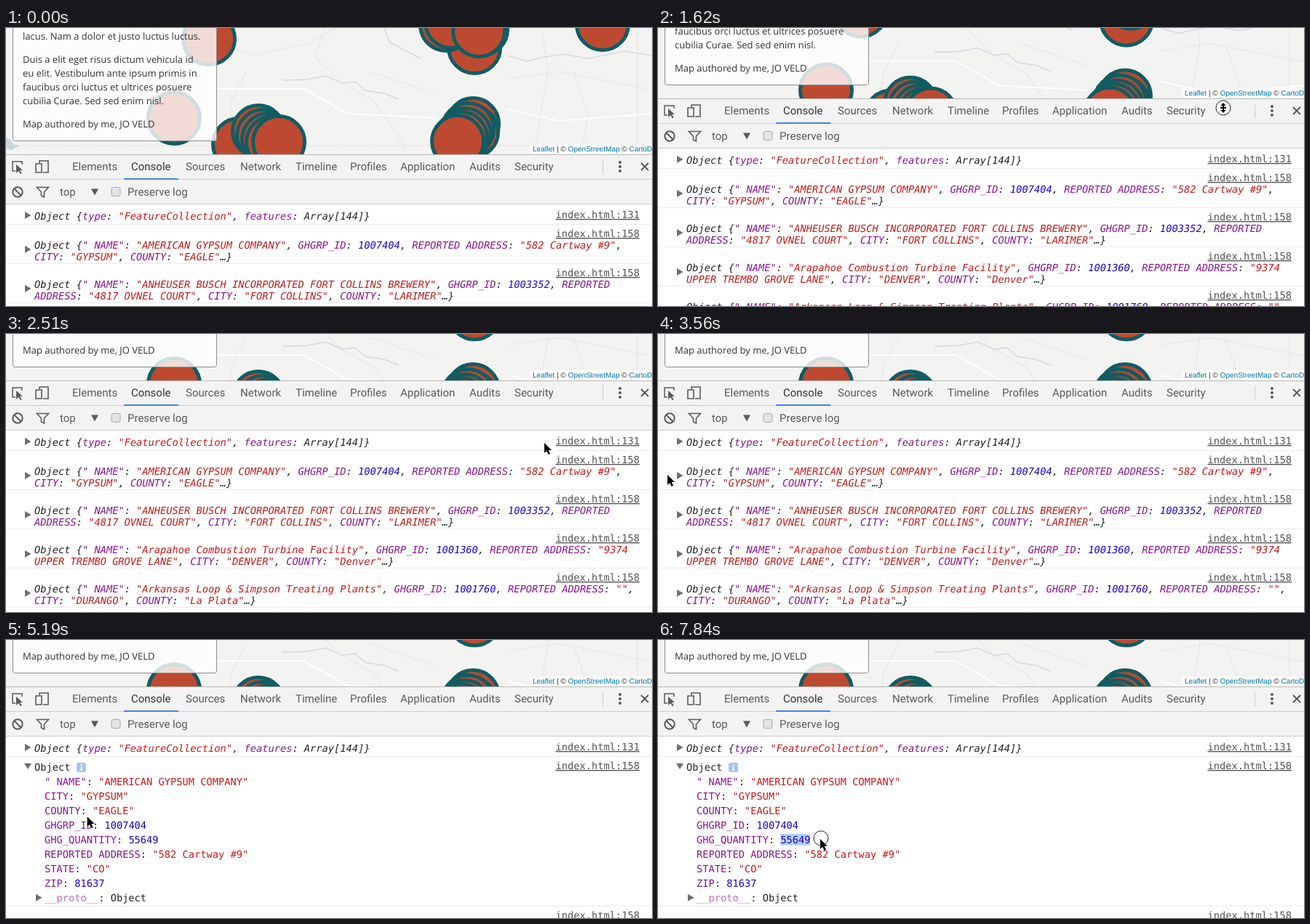
These frames come from a looping animation (888 px wide and 383 px high, 8 s). An HTML page:

```html
<!DOCTYPE html>
<html lang="en">
<head>
<meta charset="utf-8">
<title>Console walkthrough</title>
<style>
  html, body { margin: 0; width: 100%; height: 100%; overflow: hidden; background: #fff; }
  svg { display: block; text-rendering: geometricPrecision; white-space: pre; }
  .side { font: 13px "Open Sans", sans-serif; fill: #333; }
  .credit { font: 10.05px "Liberation Sans", sans-serif; fill: #333; }
  .a { fill: #0078a8; }
  .ui { font: 15px Roboto, sans-serif; fill: #5a5a5a; }
  .ui .on { fill: #333; }
  .mono { font: 13.7px "DejaVu Sans Mono", monospace; fill: #222; }
  .preview { font-style: italic; }
  .link { fill: #545454; text-decoration: underline; }
  .k { fill: #881391; }
  .s { fill: #c41a16; }
  .n { fill: #1c00cf; }
  .p { fill: #b871bd; }
  .tri { fill: #6e6e6e; }
  .rule { stroke: #ececec; }
  .icon { fill: none; stroke: #5a5a5a; stroke-width: 1.6; }
  .dots { fill: #be4931; stroke: #115c62; stroke-width: 5; }
  .road { fill: none; stroke: #e6e6ea; stroke-width: 1.2; }
  .river { fill: none; stroke: #d3dade; stroke-width: 1.5; }
</style>
</head>
<body>
<svg width="888" height="383" viewBox="0 0 888 383">
  <rect width="888" height="383" fill="#f3f3f2"/>
  <g id="map">
    <g class="road">
      <path d="M290 20L340 38 420 20 470 -10M440 -10L425 40 460 75 505 100 540 150 555 180M330 60L310 100 300 180M500 60L590 90M690 70L760 60 888 85M868 -10V180M735 -10L745 60 725 180M780 60L800 120 790 180"/>
      <path d="M290 84H410L470 118 590 124M690 112L760 128 888 118" stroke="#fff" stroke-width="2"/>
    </g>
    <path class="river" d="M380 72L412 71 440 66 462 76 480 74 494 86 520 90 540 98M690 38L716 46 740 40 766 36 800 42 850 32 890 38M520 0L528 20 570 42"/>
    <path d="M0 162H888" stroke="#ecc9cf" stroke-dasharray="2 2"/>
    <path d="M0 151L6 154 10 160 18 162 8 168 0 166Z" fill="#cbd4d8"/>
    <g id="dots" class="dots"></g>
  </g>

  <g id="page">
    <g id="side" class="side">
      <rect x="9.5" y="-260" width="280" height="305.5" rx="3" fill="#fff" fill-opacity=".8" stroke="#8c8c8c"/>
    </g>
    <rect x="720" y="50" width="168" height="14" fill="#fff" fill-opacity=".7"/>
    <text class="credit" x="724" y="60"><tspan class="a">Leaflet</tspan> | © <tspan class="a">OpenStreetMap</tspan> © <tspan class="a">CartoDB</tspan></text>

    <rect y="64" width="888" height="450" fill="#fff"/>
    <g id="body">
      <g id="first" class="mono"></g>
      <g id="rows" class="mono"></g>
      <g id="open" class="mono">
        <rect id="selection" x="168" y="267" height="16" fill="#b3d4fd"/>
        <path class="tri" d="M25 170h10l-5 8z"/>
        <rect x="97" y="169" width="13" height="13" rx="2.5" fill="#a9c5ef"/>
        <path d="M103.500 171.500v2M103.500 175v5" stroke="#fff" stroke-width="2"/>
      </g>
    </g>
    <g id="bars" class="ui">
      <rect y="64" width="888" height="69" fill="#f3f3f3"/>
      <path d="M0 64.500H888" stroke="#b8b8b8"/>
      <path d="M0 98.500H888M0 132.500H888M820.500 71V91" stroke="#ccc"/>
      <rect x="162" y="97" width="75" height="2" fill="#3e82f7"/>
      <g class="icon">
        <path d="M13 87H9V74H22V78" stroke-width="1.5"/>
        <path d="M14 78V90L17.200 87 20 91.500 21.500 90 19 86H23Z" fill="#5a5a5a" stroke="none"/>
        <path d="M46 76V73H58V89H51M41 77H49V89H41Z"/>
        <circle cx="16" cy="116" r="6.700" stroke-width="2"/>
        <path d="M11.500 111.500L20.500 120.500" stroke-width="2"/>
        <path d="M42.500 109.500H58.500L52.500 116V123L48.500 121V116Z"/>
        <path d="M873 76L883 86M883 76L873 86" stroke-width="2"/>
      </g>
      <path d="M117 111.500h10l-5 9z"/>
      <circle cx="844" cy="75" r="2"/><circle cx="844" cy="81" r="2"/><circle cx="844" cy="87" r="2"/>
      <rect x="145" y="109.500" width="12" height="12" rx="2.500" fill="#e4e4e4" stroke="#a6a6a6"/>
    </g>
  </g>

  <g id="cursor">
    <circle id="click" r="10" fill="#fff" fill-opacity=".8" stroke="#222"/>
    <path id="arrow" d="M0 0V14L3.200 11 5.500 16 8 15 5.800 10H10Z" stroke="#fff" stroke-width="1" paint-order="stroke"/>
    <path id="resize" d="M0 -7L3.500 -3H1V-1H4V1H1V3H3.500L0 7 -3.500 3H-1V1H-4V-1H-1V-3H-3.500Z"/>
  </g>
</svg>
<script>
const $ = id => document.getElementById(id);
const add = (id, markup) => $(id).insertAdjacentHTML('beforeend', markup);
// k<...>, s<...>, n<...>, p<...> mark keys, strings, numbers and prototypes
const paint = text => text.replace(/([ksnp])<(.*?)>/g, '<tspan class="$1">$2</tspan>');
const label = (x, y, text, cls = '') => `<text x="${x}" y="${y}" class="${cls}">${paint(text)}</text>`;
const link = (y, line) => label(755.5, y, `index.html:${line}`, 'link');
const rule = y => `<path class="rule" d="M0 ${y}.5H888"/>`;
const triangle = (x, y) => `<path class="tri" d="M${x} ${y - 5}v10l8.500-5z"/>`;

const dots = [
  [279, 15], [231, 124], [320, 160], [347, 142], [353, 148], [360, 153], [366, 157], [375, 157],
  [642, 132], [641, 143], [635, 139], [631, 146], [626, 151], [621, 156],
  [644, 27], [605, -4], [612, -8], [654, 2], [650, 4], [820, -5]
];
add('dots', dots.map(([x, y]) => `<circle cx="${x}" cy="${y}" r="35.5"/>`).join(''));

[
  [-94, 'lacus. Nam a dolor et justo luctus luctus.'],
  [-62, 'Duis a elit eget risus dictum vehicula id'],
  [-43, 'eu elit. Vestibulum ante ipsum primis in'],
  [-24, 'faucibus orci luctus et ultrices posuere'],
  [-5, 'cubilia Curae. Sed sed enim nisl.'],
  [27, 'Map authored by me, JO VELD']
].forEach(([y, text]) => add('side', label(23, y, text)));

Object.entries({ Elements: 91, Console: 172, Sources: 247, Network: 322, Timeline: 398,
  Profiles: 473, Application: 542, Audits: 637, Security: 699
}).forEach(([tab, x]) => add('bars', label(x, 86, tab, tab === 'Console' ? 'on' : '')));
add('bars', label(74, 121, 'top') + label(167, 121, 'Preserve log'));

add('first', triangle(26, 148) + link(152, 131) + rule(160) +
  label(39, 154, 'Object {k<type>: s<"FeatureCollection">, k<features>: Array[144]}', 'preview'));

[
  ['s<"AMERICAN GYPSUM COMPANY">, k<GHGRP_ID>: n<1007404>, k<REPORTED ADDRESS>: s<"582 Cartway #9">,',
    'k<CITY>: s<"GYPSUM">, k<COUNTY>: s<"EAGLE">…}'],
  ['s<"ANHEUSER BUSCH INCORPORATED FORT COLLINS BREWERY">, k<GHGRP_ID>: n<1003352>, k<REPORTED>',
    'k<ADDRESS>: s<"4817 OVNEL COURT">, k<CITY>: s<"FORT COLLINS">, k<COUNTY>: s<"LARIMER">…}'],
  ['s<"Arapahoe Combustion Turbine Facility">, k<GHGRP_ID>: n<1001360>, k<REPORTED ADDRESS>: s<"9374>',
    's<UPPER TREMBO GROVE LANE">, k<CITY>: s<"DENVER">, k<COUNTY>: s<"Denver">…}'],
  ['s<"Arkansas Loop &amp; Simpson Treating Plants">, k<GHGRP_ID>: n<1001760>, k<REPORTED ADDRESS>: s<"">,',
    'k<CITY>: s<"DURANGO">, k<COUNTY>: s<"La Plata">…}']
].forEach(([top, bottom], i) => {
  const y = 54 * i;
  add('rows', link(178 + y, 158) + triangle(26, 195 + y) + rule(214 + y) +
    label(39, 194 + y, 'Object {k<" NAME">: ' + top, 'preview') + label(39, 210 + y, bottom, 'preview'));
});
add('rows', link(394, 158));

add('open', label(39, 180, 'Object') + link(178, 158) + link(384, 158) + rule(366) + triangle(41, 355));
[
  'k<" NAME">: s<"AMERICAN GYPSUM COMPANY">', 'k<CITY>: s<"GYPSUM">', 'k<COUNTY>: s<"EAGLE">',
  'k<GHGRP_ID>: n<1007404>', 'k<GHG_QUANTITY>: n<55649>', 'k<REPORTED ADDRESS>: s<"582 Cartway #9">',
  'k<STATE>: s<"CO">', 'k<ZIP>: n<81637>', 'p<__proto__>: Object'
].forEach((text, i) => add('open', label(53, 200 + 20 * i, text)));

const LOOP = 8000, STEP = 148.1;
const drag = [[8, 110], [9, 102], [10, 70], [11, 33], [12, 6], [13, 0]];
const path = [
  [2, 665, 247], [3, 690, 190], [4, 722, 120], [5, 748, 80], [6, 764, 130], [7, 774, 187], [8, 774, 187],
  [9, 775, 179], [10, 776, 147], [11, 777, 110], [12, 779, 84], [13, 780, 90], [16, 778, 140],
  [17, 740, 150], [18, 600, 172], [20, 250, 200], [21, 100, 206], [22, 32, 200], [23, 13, 195], [24, 13, 194],
  [25, 20, 194], [26, 28, 193], [28, 28, 195], [29, 28, 195], [30, 32, 198], [34, 95, 235], [37, 145, 260],
  [38, 144, 266], [40, 145, 289], [42, 138, 288], [44, 80, 280], [45, 57, 278],
  [46, 47, 281], [48, 140, 272], [49, 166, 273], [51, 200, 274], [53, 223, 274]
];

function sample(keys, step) {
  const next = keys.findIndex(key => key[0] > step);
  if (next === 0) return keys[0].slice(1);
  if (next < 0) return keys.at(-1).slice(1);
  const [a, b] = [keys[next - 1], keys[next]];
  const part = (step - a[0]) / (b[0] - a[0]);
  return a.slice(1).map((v, i) => v + (b[i + 1] - v) * part);
}

const within = (step, from, to) => step >= from && step <= to;
const show = (id, on) => $(id).setAttribute('visibility', on ? 'inherit' : 'hidden');
const move = (id, x, y) => $(id).setAttribute('transform', `translate(${x} ${y})`);

function draw(now) {
  const step = Math.floor((now % LOOP + 20) / STEP);
  const [shift] = sample(drag, step);
  const [x, y] = sample(path, step);
  const resizing = within(step, 7, 13), expanded = step >= 27;

  move('map', 0, (shift - 110) / 2);
  move('page', 0, shift);
  move('body', 0, within(step, 13, 15) ? -1 : 0);
  show('rows', !expanded);
  show('open', expanded);

  const chars = step < 49 ? 0 : Math.max(0, Math.min(5, Math.round((x - 168) / 8.2)));
  $('selection').setAttribute('width', chars * 8.2);

  move('cursor', x, y);
  show('cursor', step >= 2);
  show('arrow', !resizing);
  show('resize', resizing);
  show('click', within(step, 9, 13) || step === 27 || step >= 49);
  move('click', resizing ? 0 : 1, resizing ? 0 : -1);
  requestAnimationFrame(() => draw(performance.now()));
}
draw(performance.now());
</script>
</body>
</html>
```
